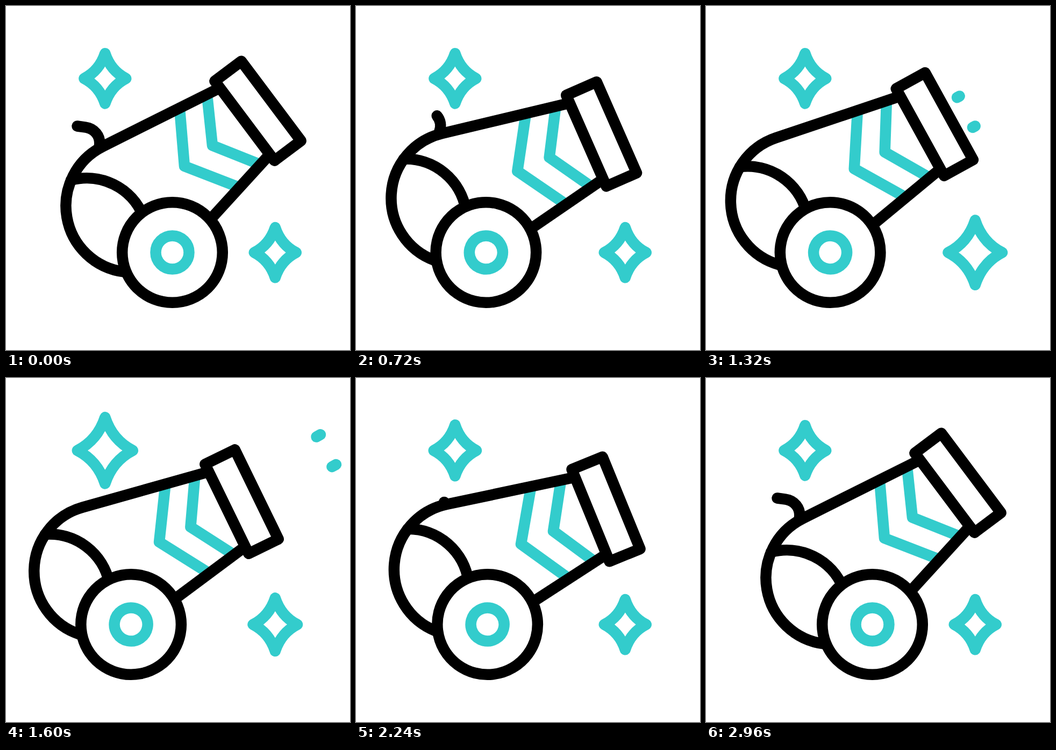
These frames come from a looping animation (640x640 px, 3 s). An HTML page:

```html
<!DOCTYPE html>
<html lang="en">
<head>
<meta charset="utf-8">
<title>Cannon</title>
<style>
  html, body { margin: 0; width: 100%; height: 100%; overflow: hidden; background: #fff; }
  svg { display: block; width: 100%; height: 100%; }
  svg * { fill: none; stroke-width: 20.5; stroke-linecap: round; stroke-linejoin: round; }
  .ink { stroke: #000; }
  .teal { stroke: #3cc; }
  #wheel { fill: #fff; }
</style>
</head>
<body>
<svg viewBox="0 0 640 640">
  <path id="starA" class="teal"/>
  <path id="starB" class="teal"/>
  <path id="streakA" class="teal"/>
  <path id="streakB" class="teal"/>
  <!-- the wheel's centre is the origin of the cannon -->
  <g id="cannon">
    <g transform="translate(-309.5 -458.5)">
      <path class="teal" d="M323 190L332 298L434 337.5M374 165L384 259.5L473 295"/>
      <path id="fuse" class="ink" pathLength="100" d="M174 259C176 241 164 228 148 225.7L132.5 223.5"/>
      <path class="ink" d="M395 153.8L179.7 261.5A123.6 123.6 0 0 0 220 494.7"/>
      <path class="ink" d="M121 324A113.7 113.7 0 0 1 255 390M383 394L488 279"/>
      <path class="ink" d="M437.7 102.7L548.7 250.7L499.4 287.7L388.4 139.7Z"/>
    </g>
    <circle id="wheel" class="ink" r="93.3"/>
    <circle class="teal" r="31"/>
  </g>
</svg>
<script>
const LOOP = 3000, STEP = 40;
const el = id => document.getElementById(id);

// Cubic Bezier easing with flat ends; a and b are the handles' x positions.
const ease = (a, b) => s => {
  let lo = 0, hi = 1;
  for (let i = 0; i < 24; i++) {
    const u = (lo + hi) / 2, v = 1 - u;
    if (3 * u * v * v * a + 3 * u * u * v * b + u ** 3 < s) lo = u; else hi = u;
  }
  return lo * lo * (3 - 2 * lo);
};
const smooth = s => s * s * (3 - 2 * s);
const linear = s => s;
const glide = ease(.48, .38);
const swing = ease(.4, .42);

// Each key: [time, value, easing used on the way to it]
const tracks = {
  x: [[110, 309.5], [895, 238, glide], [1183, 238], [1412, 227.3, smooth],
      [1790, 238, smooth], [2040, 238], [2960, 309.5, glide]],
  angle: [[110, 0], [895, 13.9, glide], [1183, 13.9], [1412, 4.8, smooth],
      [1790, 17.1, smooth], [2020, 17.1], [2960, 0, swing]],
  fuse: [[240, 100], [1190, 0, smooth], [2220, 0], [2700, 100, smooth]],
  starA: [[1370, 1], [1832, 1.65, smooth], [2285, 1, smooth]],
  starB: [[800, 1], [1270, 1.3, smooth], [1730, 1, smooth]],
  head: [[1290, 0], [1540, 1, smooth]],
  tail: [[1380, 0], [1640, 1, smooth]]
};

function valueAt(keys, t) {
  if (t <= keys[0][0]) return keys[0][1];
  for (let i = 1; i < keys.length; i++) {
    const [t0, v0] = keys[i - 1], [t1, v1, curve = linear] = keys[i];
    if (t < t1) return v0 + (v1 - v0) * curve((t - t0) / (t1 - t0));
  }
  return keys[keys.length - 1][1];
}

function starPath(cx, cy, k) {
  const at = (x, y) => `${cx + x * k} ${cy + y * k}`;
  const w = 39, h = 46.6, p = 10.5, q = 14.5;
  return `M${at(0, -h)}Q${at(p, -q)} ${at(w, 0)}Q${at(p, q)} ${at(0, h)}` +
         `Q${at(-p, q)} ${at(-w, 0)}Q${at(-p, -q)} ${at(0, -h)}Z`;
}

function streakPath(x, y, head, tail) {
  const dx = 118, dy = -65;
  return `M${x + dx * tail} ${y + dy * tail}L${x + dx * head} ${y + dy * head}`;
}

function draw(t) {
  const now = name => valueAt(tracks[name], t);
  el('cannon').setAttribute('transform', `translate(${now('x')} 458.5) rotate(${now('angle')})`);

  const fuse = now('fuse');
  el('fuse').setAttribute('stroke-dasharray', `${fuse} 300`);
  el('fuse').style.display = fuse > 0 ? '' : 'none';

  el('starA').setAttribute('d', starPath(184.3, 134.8, now('starA')));
  el('starB').setAttribute('d', starPath(500.8, 458.7, now('starB')));

  const head = now('head'), tail = now('tail');
  const flying = head > 0 && tail < 1;
  el('streakA').setAttribute('d', flying ? streakPath(467, 170.3, head, tail) : '');
  el('streakB').setAttribute('d', flying ? streakPath(496, 226, head, tail) : '');
}

const start = performance.now();
function tick() {
  const t = (performance.now() - start) % LOOP;
  draw(Math.floor(t / STEP) * STEP);
  requestAnimationFrame(tick);
}
tick();
</script>
</body>
</html>
```
